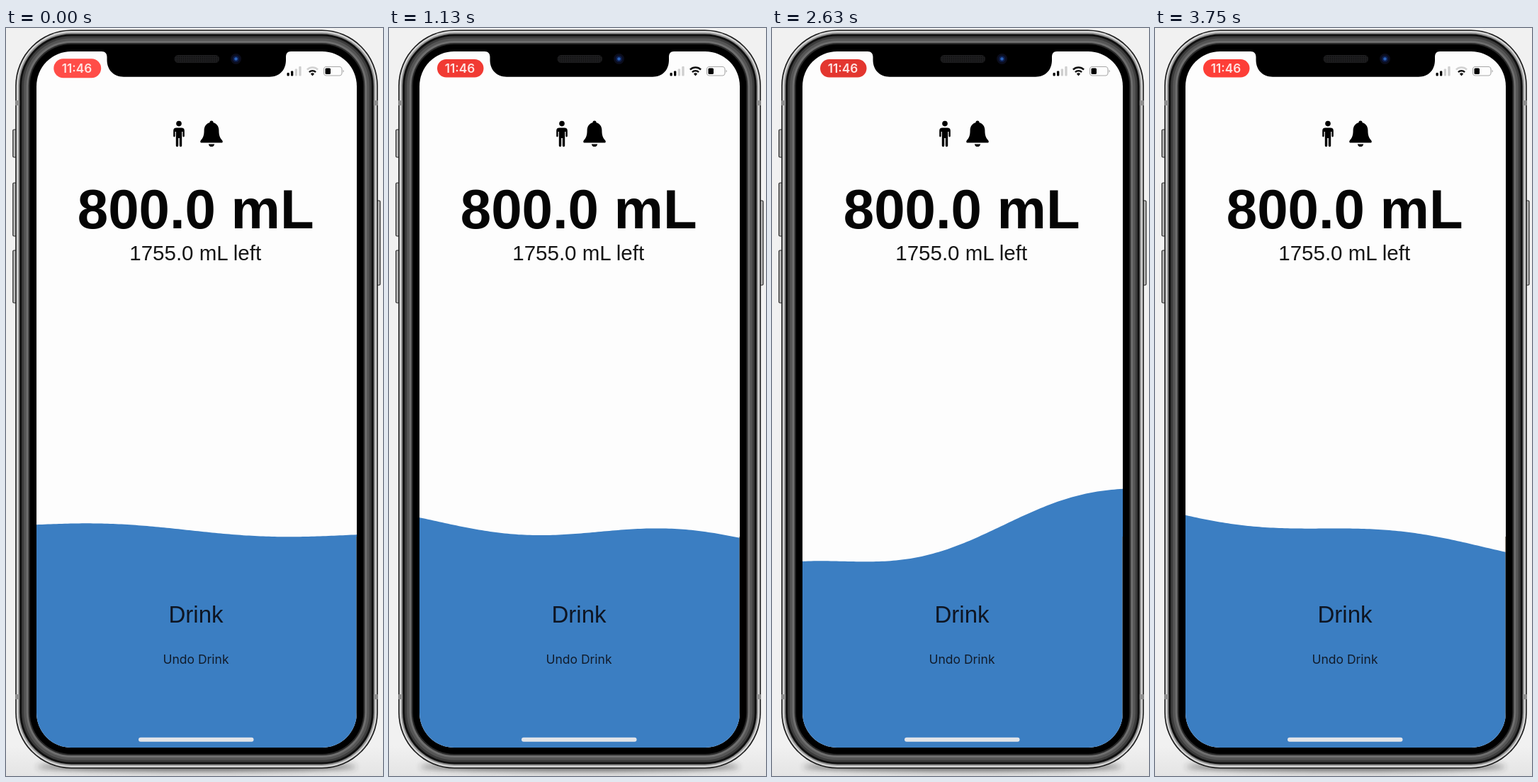
Animation of 532 by 1053 pixels, one loop 3870 ms. Source, as an HTML page:

```html
<!DOCTYPE html>
<html lang="en">
<head>
<meta charset="utf-8">
<title>Water tracker</title>
<style>
  html, body { margin: 0; width: 100%; height: 100%; overflow: hidden; background: #f1f1f1; }
  svg { display: block; width: 100%; height: 100%; }
  text { text-anchor: middle; }
  .sans { font-family: "Liberation Sans", Arial, sans-serif; }
  .ui { font-family: Inter, Roboto, sans-serif; }
</style>
</head>
<body>
<svg viewBox="0 0 532 1053" xmlns="http://www.w3.org/2000/svg">
  <defs>
    <clipPath id="screen"><rect x="43" y="33" width="452" height="980" rx="49"/></clipPath>
    <filter id="blur" x="-20%" y="-200%" width="140%" height="500%"><feGaussianBlur stdDeviation="4"/></filter>
    <linearGradient id="floor" x1="0" y1="0" x2="0" y2="1">
      <stop offset="0" stop-color="#f1f1f1"/><stop offset="1" stop-color="#e4e4e4"/>
    </linearGradient>
    <pattern id="mesh" width="3" height="3" patternUnits="userSpaceOnUse">
      <rect width="3" height="3" fill="#1d1d1f"/><circle cx="1.5" cy="1.5" r=".8" fill="#0a0a0a"/>
    </pattern>
  </defs>

  <rect width="532" height="1053" fill="#f1f1f1"/>
  <rect y="1010" width="532" height="43" fill="url(#floor)"/>
  <ellipse cx="269" cy="1040" rx="225" ry="6" fill="#333" opacity=".75" filter="url(#blur)"/>

  <g id="buttons" fill="#b9b9b9" stroke="#262626" stroke-width="1.2"></g>
  <g id="body"></g>
  <g id="bands" fill="#8f8f8f"></g>

  <g clip-path="url(#screen)">
    <rect x="43" y="33" width="452" height="980" fill="#fdfdfd"/>
    <path id="water" fill="#3b7ec2"/>
    <path d="M494.8 716V972" stroke="#6f6150" stroke-width=".8"/>
    <path d="M135 32H402V33C397 33 395 36 395 41V45C395 59 386 68.7 372 68.7H166C152 68.7 142.5 59 142.5 45V41C142.5 36 140 33 135 33Z" fill="#000"/>

    <rect id="pill"/>
    <text class="ui" x="100" y="62.6" font-size="17.2" font-weight="600" fill="#ffe4e2">11:46</text>

    <g>
      <rect x="396.5" y="63" width="3.3" height="4.5" rx="1"/>
      <rect x="402" y="60.5" width="3.3" height="7" rx="1"/>
      <rect x="407.7" y="57.5" width="3.3" height="10" rx="1" fill="#cfcfcf"/>
      <rect x="413.3" y="54" width="3.3" height="13.5" rx="1" fill="#cfcfcf"/>
    </g>
    <g fill="none" stroke="#111" stroke-width="2.5">
      <path id="arc" d="M424.9 58.6A11 11 0 0 1 440.1 58.6"/>
      <path d="M427.9 62.1A6.7 6.7 0 0 1 437.1 62.1"/>
      <path d="M432.5 67.4L429.8 64.6A3.8 3.8 0 0 1 435.2 64.6Z" fill="#111" stroke="none"/>
    </g>
    <rect x="448.5" y="54.5" width="25.5" height="12.5" rx="3.6" fill="none" stroke="#a8a8a8" stroke-width="1.1"/>
    <rect x="450.5" y="56.5" width="7.5" height="8.5" rx="1.6"/>
    <path d="M475.5 58.7Q478.2 60.7 475.5 62.8Z" fill="#a8a8a8"/>

    <circle cx="244" cy="134.6" r="3.8"/>
    <path d="M240.4 140.4H247.6Q251.8 140.4 251.8 144.4V152Q251.8 153.4 250.6 153.4T249.4 152V146H248.2V165.6Q248.2 167.2 246.5 167.2T244.8 165.6V155H243.2V165.6Q243.2 167.2 241.5 167.2T239.8 165.6V146H238.6V152Q238.6 153.4 237.4 153.4T236.2 152V144.4Q236.2 140.4 240.4 140.4Z"/>
    <path d="M290 130.5Q292.6 130.5 292.6 133.2C297.8 134.4 300.4 139 300.4 144C300.4 152 302.4 155.4 305.2 158.2Q307 161.6 303.6 161.6H276.4Q273 161.6 274.8 158.2C277.6 155.4 279.6 152 279.6 144C279.6 139 282.2 134.4 287.4 133.2Q287.4 130.5 290 130.5Z"/>
    <path d="M285.8 163.4H294.2Q293.4 167 290 167T285.8 163.4Z"/>

    <text class="sans" x="267.7" y="282" font-size="78" font-weight="700" fill="#050505">800.0 mL</text>
    <text class="sans" x="267.2" y="327" font-size="29.5" fill="#151515">1755.0 mL left</text>
    <text class="sans" x="268" y="837" font-size="33" fill="#0e1522">Drink</text>
    <text class="ui" x="268" y="895" font-size="17.5" fill="#111c2c">Undo Drink</text>
    <rect x="187" y="998.8" width="162.5" height="6" rx="3" fill="#e1e4e9"/>
  </g>

  <rect x="237.5" y="38" width="63.5" height="11" rx="5.5" fill="url(#mesh)"/>
  <circle cx="324.5" cy="43.5" r="7.5" fill="#0b0d1c"/>
  <circle cx="324.5" cy="43.5" r="4.6" fill="#0d1d4a"/>
  <circle cx="324.5" cy="43.5" r="2.3" fill="#2b62b8"/>
</svg>
<script>
const $ = id => document.getElementById(id);

function add(parent, name, attrs) {
  const el = document.createElementNS("http://www.w3.org/2000/svg", name);
  return set(parent.appendChild(el), attrs);
}
function set(el, attrs) {
  for (const key in attrs) el.setAttribute(key, attrs[key]);
  return el;
}

// Phone shell: nested rounded rectangles, [inset, colour]
const shell = [
  [0, "#1b1b1b"], [1.6, "#d4d4d4"], [4, "#8f8f8f"], [6, "#101010"],
  [9, "#3c3c3c"], [12, "#555"], [15.5, "#6e6e6e"], [18.5, "#2a2a2a"], [20.5, "#000"]
];
for (const [d, fill] of shell)
  add($("body"), "rect", { x: 13.2 + d, y: 2.5 + d, width: 511.6 - 2 * d, height: 1040 - 2 * d, rx: 79 - d, fill });

for (const [x, y, height] of [[9.8, 143, 39], [9.8, 218, 75], [9.8, 313, 74], [522, 243, 119]])
  add($("buttons"), "rect", { x, y, width: 6, height, rx: 1.5 });

for (const x of [13.2, 518.8])
  for (const y of [102, 938])
    add($("bands"), "rect", { x, y, width: 6, height: 7 });

const LOOP = 3870, STEP = 125;

// Water pose: [step, tilt, ripple height, ripple phase in degrees, level]
const poses = [
  [0, 14, 5.5, 190, 707.2],
  [5, 17, 16.3, 316, 707.7],
  [13, 28, 5, 367, 707.4],
  [17, -44, 11, 513, 708],
  [21, -102, 18, 674, 712.8],
  [26, 5, 5.6, 950, 707.5],
  [30, 52, 8.6, 1105, 708.2]
];

function slope(i, c) {
  const a = poses[Math.max(i - 1, 0)], b = poses[Math.min(i + 1, poses.length - 1)];
  return (b[c] - a[c]) / (b[0] - a[0]);
}

// Hermite curve through the poses for one column
function poseAt(step, c) {
  let i = 0;
  while (i < poses.length - 2 && step >= poses[i + 1][0]) i++;
  const a = poses[i], b = poses[i + 1], span = b[0] - a[0], s = (step - a[0]) / span;
  const s2 = s * s, s3 = s2 * s;
  return a[c] * (2 * s3 - 3 * s2 + 1) + b[c] * (3 * s2 - 2 * s3) +
    span * (slope(i, c) * (s3 - 2 * s2 + s) + slope(i + 1, c) * (s3 - s2));
}

function waterPath(step) {
  const [tilt, height, phase, level] = [1, 2, 3, 4].map(c => poseAt(step, c));
  let d = "M43 1014";
  for (let i = 0; i <= 113; i++) {
    const u = i / 113;
    const y = level + tilt * (u - 0.5) + height * Math.sin(2 * Math.PI * u + phase * Math.PI / 180);
    d += `L${43 + 452 * u} ${y.toFixed(2)}`;
  }
  return d + "L495 1014Z";
}

function pillColour(step) {
  if (step === 0) return "#ff4d48";
  const glow = 0.5 - 0.5 * Math.cos(2 * Math.PI * (step - 5) / 16);
  const mix = (a, b) => Math.round(a + (b - a) * glow);
  return `rgb(${mix(227, 254)},${mix(54, 62)},${mix(47, 55)})`;
}

function draw(ms) {
  const step = Math.floor(ms % LOOP / STEP);
  const grow = step === 0 ? 0.7 : 0;
  set($("water"), { d: waterPath(step) });
  set($("pill"), {
    x: 68 - grow, y: 44 - grow, width: 65.5 + 2 * grow, height: 25.5 + 2 * grow,
    rx: 12.75 + grow, fill: pillColour(step)
  });
  set($("arc"), { stroke: step === 0 || step > 27 ? "#d2d2d2" : "#111" });
}

let start;
function tick(now) {
  start ??= now;
  draw(now - start);
  requestAnimationFrame(tick);
}
draw(0);
requestAnimationFrame(tick);
</script>
</body>
</html>
```
